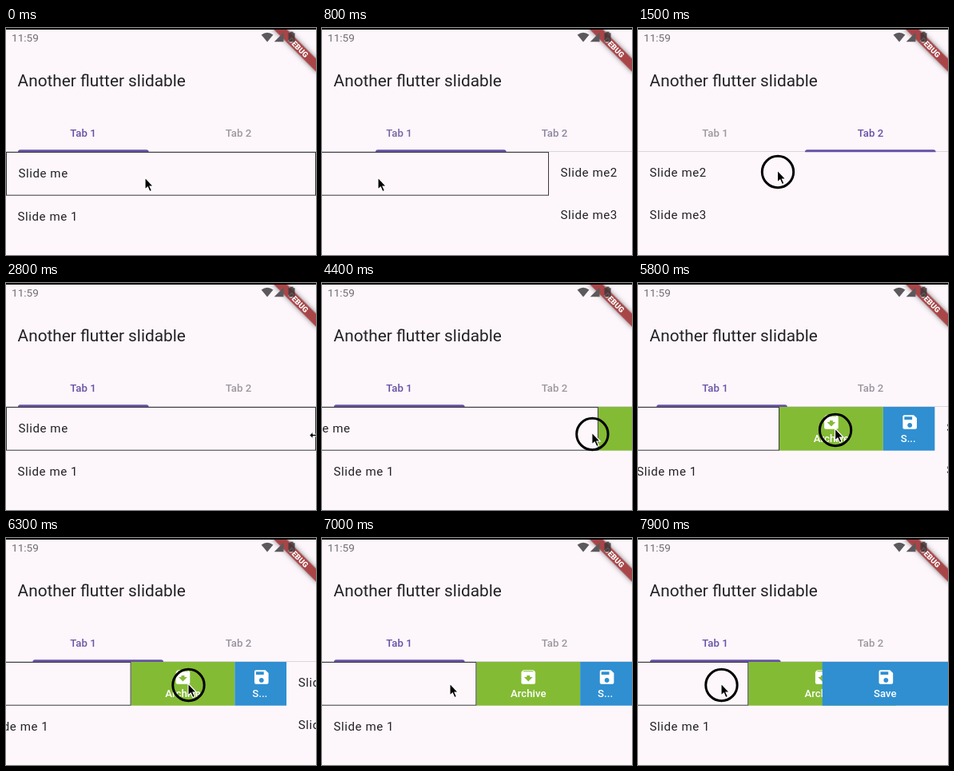
An HTML page for the animation above (8000 ms loop, 388 by 284 pixels).

```html
<!DOCTYPE html>
<html lang="en">
<head>
<meta charset="utf-8">
<title>Slidable list</title>
<style>
  html, body { margin: 0; width: 100%; height: 100%; overflow: hidden; background: #fdf7fc; }
  svg { display: block; }
  text { font-family: Roboto, "Open Sans", sans-serif; fill: #232125; }
  .title { font-size: 20.8px; }
  .row { font-size: 15.1px; letter-spacing: .55px; }
  .tab { font-size: 13.2px; font-weight: 500; text-anchor: middle; }
  .label { font-size: 13.2px; font-weight: 500; text-anchor: middle; fill: #fff; }
  .clock { font-size: 13.6px; fill: #716e72; }
  .banner { filter: drop-shadow(0 0 3px rgba(0, 0, 0, .5)); }
  .debug { font-size: 9.6px; font-weight: 900; text-anchor: middle; fill: #fff; }
</style>
</head>
<body>
<svg width="388" height="284" viewBox="0 0 388 284">
  <rect width="388" height="284" fill="#fdf7fc"/>

  <text class="title" x="14.6" y="73">Another flutter slidable</text>
  <text class="tab" id="tab1" x="96.5" y="136">Tab 1</text>
  <text class="tab" id="tab2" x="291" y="136">Tab 2</text>
  <rect y="154" width="388" height="1" fill="#dad5dd"/>
  <path id="bar" d="M15 155.2v-.2a2.8 2.8 0 0 1 2.8-2.8h158a2.8 2.8 0 0 1 2.8 2.8v.2z" fill="#6750a4"/>

  <svg id="page1" y="155" width="388" height="129">
    <g id="archive">
      <rect id="archiveBox" height="54.7" fill="#84bb35"/>
      <g id="archiveFace">
        <path transform="translate(0 19) scale(.98) translate(-12 -12)" fill="#fff" d="M20.54 5.23l-1.39-1.68C18.88 3.21 18.47 3 18 3H6c-.47 0-.88.21-1.16.55L3.46 5.23C3.17 5.57 3 6.02 3 6.5V19c0 1.1.9 2 2 2h14c1.1 0 2-.9 2-2V6.5c0-.48-.17-.93-.46-1.27zM12 17.5L6.5 12H10v-2h4v2h3.5L12 17.5zM5.12 5l.81-1h12l.94 1z"/>
        <text class="label" y="43.5">Archive</text>
      </g>
    </g>
    <g id="save">
      <rect id="saveBox" height="54.7" fill="#2f8fd1"/>
      <g id="saveFace">
        <path transform="translate(1 19) scale(.98) translate(-12 -12)" fill="#fff" d="M17 3H5c-1.11 0-2 .9-2 2v14c0 1.1.89 2 2 2h14c1.1 0 2-.9 2-2V7l-4-4zm-5 16c-1.66 0-3-1.34-3-3s1.34-3 3-3 3 1.34 3 3-1.34 3-3 3zm3-10H5V5h10v4z"/>
        <text class="label" id="saveText" y="43.5">Save</text>
      </g>
    </g>
    <g id="cell">
      <rect x=".5" y=".5" width="387" height="53.7" fill="#fdf7fc" stroke="#39373b"/>
      <text class="row" x="15.5" y="32">Slide me</text>
    </g>
    <text class="row" x="14.6" y="86">Slide me 1</text>
  </svg>

  <svg id="page2" y="155" width="388" height="129">
    <text class="row" x="14.6" y="31">Slide me2</text>
    <text class="row" x="14.6" y="84">Slide me3</text>
  </svg>

  <g transform="translate(388 1) rotate(45)">
    <rect class="banner" x="-40" y="26.4" width="80" height="11.4" fill="#a84547"/>
    <text class="debug" x=".8" y="35.5">DEBUG</text>
  </g>
  <rect width="388" height="2" fill="#000"/>
  <text class="clock" x="7" y="17">11:59</text>
  <g fill="#5c595d">
    <path d="M319.6 8.6q7.4-5.8 14.8 0L327 17.4z"/>
    <path d="M347.5 5.5v11.8h-11.8z"/>
    <path d="M355.5 6.2v-1.4h4v1.4h2v11.2h-8V6.2z" fill="#3f3537" opacity=".85"/>
  </g>

  <g id="pointer">
    <circle id="ring" cx=".5" cy="2" r="19.7" fill="none" stroke="#000" stroke-width="3"/>
    <path id="arrow" d="M0 0v15l3.4-3 2.5 5.6 2.6-1.1-2.5-5.5h4.4z" fill="#000" stroke="#fff" stroke-width="1.1"/>
    <path id="resize" d="M-4 3.5L0-.8v3h8v-3l4 4.3-4 4.3v-3H0v3z" fill="#000" stroke="#fff" stroke-width="1"/>
  </g>
</svg>

<script>
const $ = id => document.getElementById(id);
const LOOP = 8000, STEP = 100, SETTLE = 450, W = 388;
const OPEN = W / 2 + .6, SAVE_W = OPEN / 3, ARCHIVE_W = OPEN - SAVE_W;

// Each drag pulls the page or the cell, which then settles at rest.
const drags = [
  { from: 200, to: 800, x: 174, y: 187, dx: -104, moves: 'page', pull: 104, rest: W },
  { from: 1500, to: 2000, x: 174.5, y: 178, dx: 125, moves: 'page', pull: -125, rest: 0 },
  { from: 2600, to: 2800, x: 404, y: 187, dx: -20 },
  { from: 3400, to: 4800, x: 380, y: 187, dx: -59, moves: 'cell', pull: 59, rest: OPEN },
  { from: 5400, to: 6500, x: 261.5, y: 182, dx: -41, moves: 'page', pull: 45, rest: 0 },
  { from: 7200, to: 8000, x: 160, y: 182, dx: -64, moves: 'cell', pull: 63, rest: OPEN },
];

const part = (t, from, to) => Math.min(1, Math.max(0, (t - from) / (to - from)));
const mix = (a, b, u) => a + (b - a) * u;
const ease = u => 1 - (1 - u) ** 2.5;

function offset(kind, t) {
  let pos = 0;
  for (const d of drags) {
    if (d.moves !== kind || t < d.from) continue;
    pos += d.pull * part(t, d.from, d.to);
    pos = mix(pos, d.rest, ease(part(t, d.to, d.to + SETTLE)));
  }
  return pos;
}

function pointerAt(t) {
  let { x, y } = drags[0];
  for (const [i, d] of drags.entries()) {
    const start = i ? drags[i - 1].to : 0;
    const u = ease(part(t, start, Math.min(d.from, start + 500)));
    x = mix(x, d.x, u) + d.dx * part(t, d.from, d.to);
    y = mix(y, d.y, u);
  }
  return [x, y];
}

const move = (id, x, y = 0) => $(id).setAttribute('transform', `translate(${x} ${y})`);
const show = (id, on) => $(id).setAttribute('visibility', on ? 'visible' : 'hidden');

function tabColor(amount) {
  const gray = [156, 152, 157], purple = [103, 80, 164];
  return `rgb(${gray.map((g, i) => Math.round(mix(g, purple[i], amount)))})`;
}

function placeAction(name, x, width) {
  move(name, x);
  $(name + 'Box').setAttribute('width', width);
  move(name + 'Face', width / 2);
}

function draw(t) {
  const page = offset('page', t), slide = offset('cell', t);

  $('page1').setAttribute('x', -page);
  $('page2').setAttribute('x', W - page);
  move('bar', page / 2);
  $('tab1').style.fill = tabColor(1 - page / W);
  $('tab2').style.fill = tabColor(page / W);

  // A long pull lets Save grow over Archive.
  const archiveW = Math.max(ARCHIVE_W, slide - SAVE_W);
  const saveW = mix(SAVE_W, slide, part(t, 7700, 8100));
  const tight = saveW < 74;
  move('cell', -slide);
  placeAction('archive', W - slide, archiveW);
  placeAction('save', W - slide + archiveW + SAVE_W - saveW, saveW);
  $('saveText').textContent = tight ? 'S...' : 'Save';
  $('saveText').setAttribute('x', tight ? -1 : 0);

  const atEdge = t >= 2800 && t < 2900;
  move('pointer', ...pointerAt(t));
  show('ring', drags.some(d => d.moves && t >= d.from - 100 && t < d.to));
  show('arrow', !atEdge);
  show('resize', atEdge);
}

const start = performance.now();
function tick() {
  const t = (performance.now() - start) % LOOP;
  draw(Math.floor(t / STEP) * STEP);
  requestAnimationFrame(tick);
}
tick();
</script>
</body>
</html>
```
